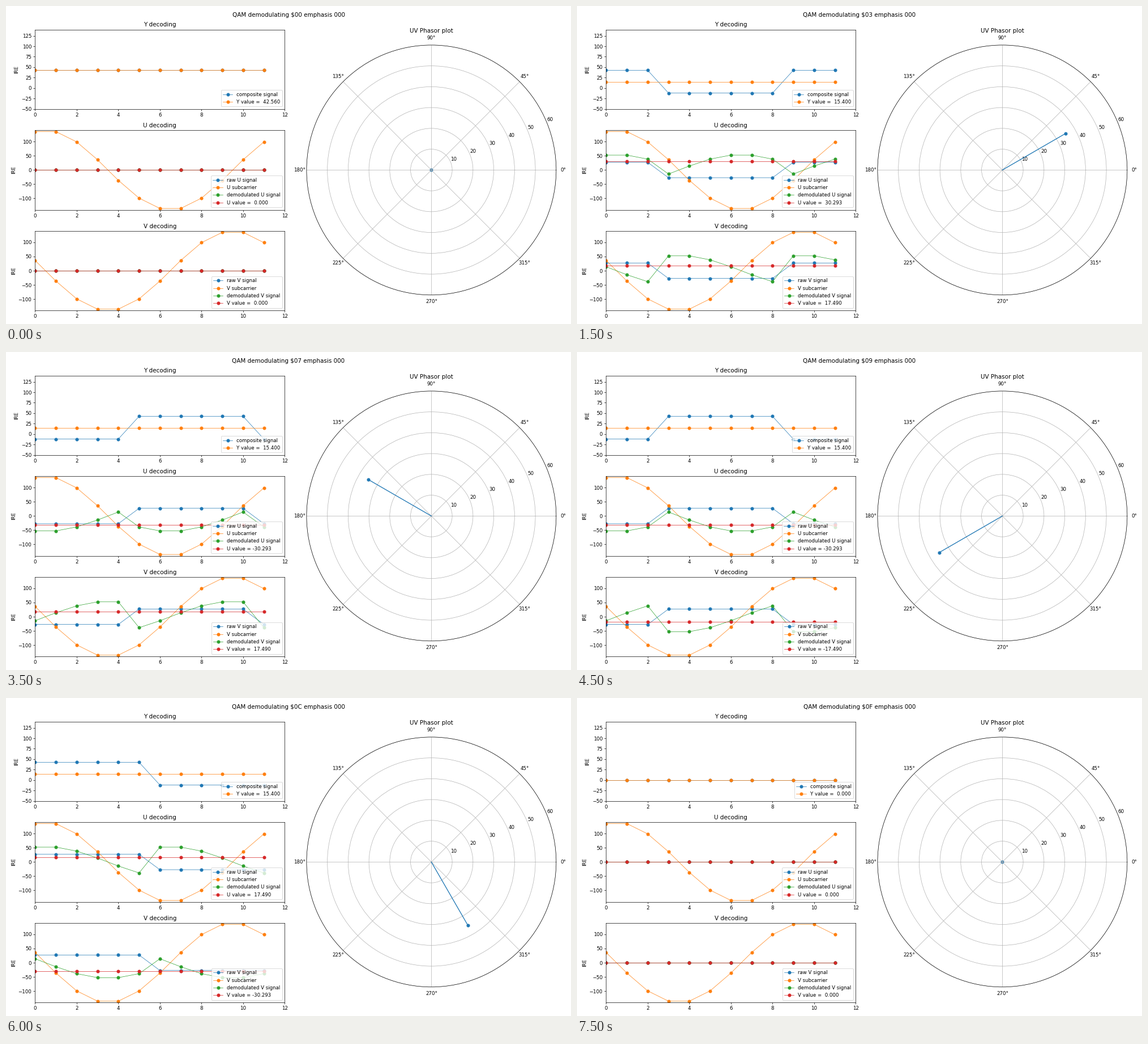
A matplotlib script for the animation above (8 s loop, 998x561 px).

```python
import numpy as np
import matplotlib.pyplot as plt
from matplotlib.animation import FuncAnimation

W, H, DPI = 998, 561, 62.4
HIGH, LOW = 42.56, -11.76
SAMPLES = np.arange(12)
PHASE = 2 * np.pi * (SAMPLES - 0.5) / 12
CARRIERS = {"U": np.cos(PHASE), "V": -np.sin(PHASE)}

plt.rcdefaults()
fig = plt.figure(figsize=(W / DPI, H / DPI), dpi=DPI)
title = fig.suptitle("")


def add_axes(x, y, w, h, **kw):
    """Add axes from a pixel box measured from the top left."""
    return fig.add_axes([x / W, 1 - (y + h) / H, w / W, h / H], **kw)


def signal_panel(row, name, bottom, yticks, labels):
    ax = add_axes(51.4, 41.5 + 177.7 * row, 440.9, 140.3)
    ax.set_title(f"{name} decoding")
    ax.set_ylabel("IRE")
    ax.set(xlim=(0, 12), ylim=(bottom, 140), yticks=yticks)
    lines = [ax.plot(SAMPLES, 0 * SAMPLES, "o-", lw=0.8, label=text)[0]
             for text in labels]
    legend = ax.legend(loc="lower right")
    return lines, legend.get_texts()[-1]


def chroma_labels(name):
    return [f"raw {name} signal", f"{name} subcarrier",
            f"demodulated {name} signal", f"{name} value"]


panels = {"Y": signal_panel(0, "Y", -50, range(-50, 126, 25),
                            ["composite signal", "Y value"])}
for row, name in enumerate("UV", 1):
    panels[name] = signal_panel(row, name, -140, range(-100, 101, 50),
                                chroma_labels(name))
    panels[name][0][1].set_ydata(140 * CARRIERS[name])

polar = add_axes(530.9, 41.5, 440.9, 495.7, projection="polar")
polar.set_title("UV Phasor plot")
tip = polar.scatter([0], [0])
arm, = polar.plot([0, 0], [0, 0])
polar.set_ylim(0, 60)
polar.set_yticks(range(10, 61, 10))


def composite(hue):
    if hue > 13:
        return np.zeros(12)
    if hue == 0:
        return np.full(12, HIGH)
    if hue == 13:
        return np.full(12, LOW)
    return np.where((SAMPLES + hue) % 12 < 6, HIGH, LOW)


def show_value(name, value):
    lines, text = panels[name]
    lines[-1].set_ydata(np.full(12, value))
    text.set_text(f"{name} value = {round(value, 3) + 0.0: .3f}")


def update(hue):
    title.set_text(f"QAM demodulating \\$0{hue:X} emphasis 000")
    signal = composite(hue)
    luma = signal.mean()
    panels["Y"][0][0].set_ydata(signal)
    show_value("Y", luma)

    raw = signal - luma
    uv = []
    for name, carrier in CARRIERS.items():
        demod = 2 * raw * carrier
        lines = panels[name][0]
        lines[0].set_ydata(raw)
        lines[2].set_ydata(demod)
        show_value(name, demod.mean())
        uv.append(demod.mean())

    angle, radius = np.arctan2(uv[1], uv[0]), np.hypot(*uv)
    tip.set_offsets([[angle, radius]])
    arm.set_data([angle, angle], [0, radius])
    return []


anim = FuncAnimation(fig, update, frames=16, interval=500,
                     repeat=True, repeat_delay=0, blit=False)
plt.show()
```
